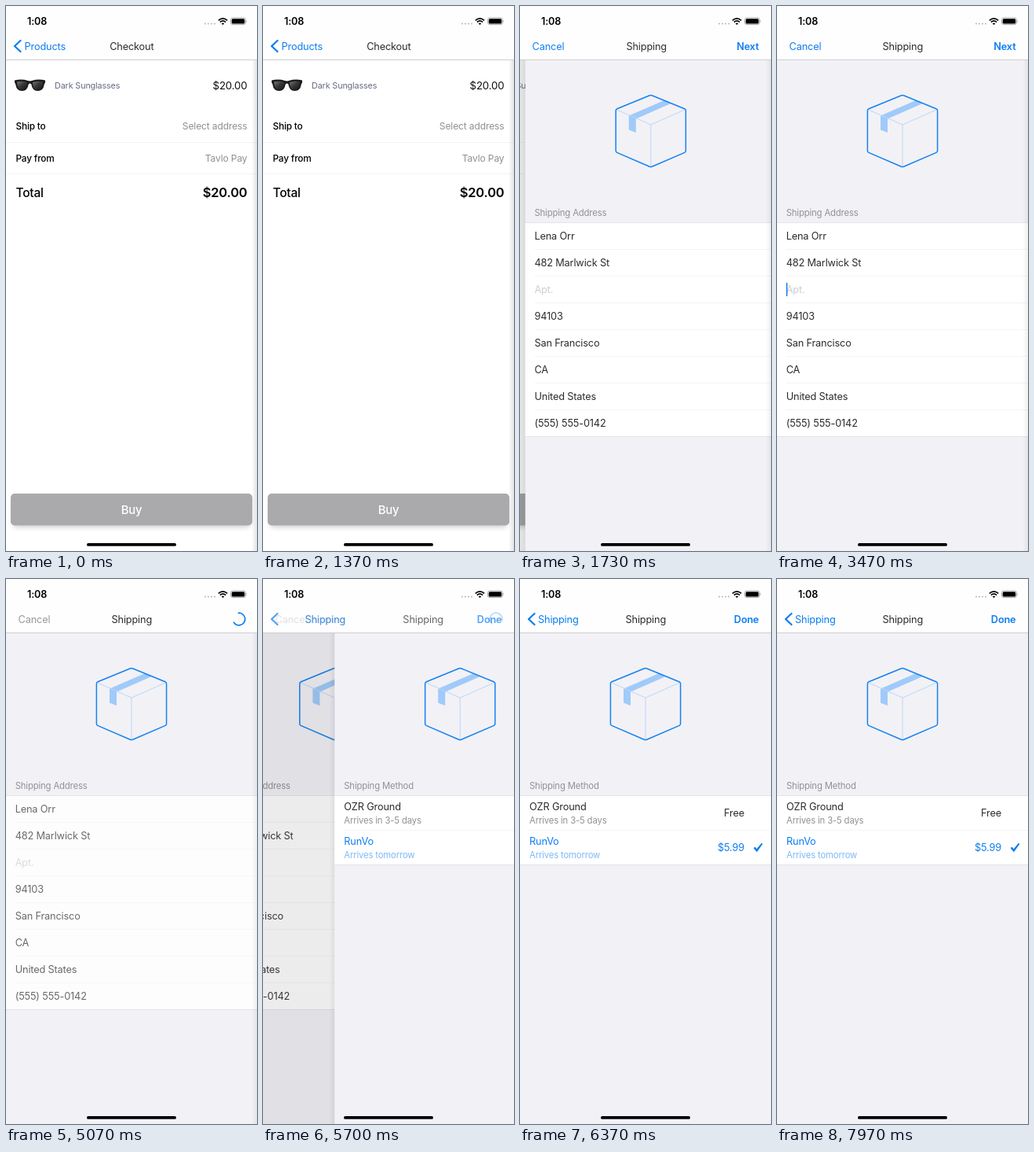
Recreate the animation shown at these times as an HTML page. Size 320 by 693 pixels, loop 8 s.

```html
<!DOCTYPE html>
<html lang="en">
<head>
<meta charset="utf-8">
<title>Checkout flow</title>
<style>
  html, body { margin: 0; width: 100%; height: 100%; overflow: hidden; background: #fff; }
  svg { display: block; width: 100vw; height: 100vh; }
  text { font-family: Inter, Roboto, sans-serif; font-size: 12.75px; letter-spacing: -.013em; fill: #2c2c2e; white-space: pre; }
  .blue { fill: #0d7df0; }
  .bold { font-weight: 600; }
  .med { font-weight: 500; }
  .mid { text-anchor: middle; }
  .end { text-anchor: end; }
  .head { font-size: 11.3px; fill: #919096; }
  .grey { fill: #909095; }
  .hint { fill: #cfcfd3; }
  .rule { stroke: #f4f3f6; stroke-width: 1; }
  .edge { stroke: #e5e4e8; stroke-width: 1; }
  .chevron { fill: none; stroke: #0d7df0; stroke-width: 2.3; stroke-linecap: round; stroke-linejoin: round; }
</style>
</head>
<body>
<svg viewBox="0 0 320 693" preserveAspectRatio="none">
  <defs>
    <linearGradient id="lens" x1="0" y1="0" x2="1" y2="1">
      <stop offset="0" stop-color="#77777a"/>
      <stop offset=".45" stop-color="#3a3a3c"/>
      <stop offset="1" stop-color="#151516"/>
    </linearGradient>
    <linearGradient id="shade">
      <stop offset="0" stop-color="#000" stop-opacity="0"/>
      <stop offset="1" stop-color="#000" stop-opacity=".06"/>
    </linearGradient>
    <filter id="soft" x="-10%" y="-30%" width="120%" height="180%">
      <feGaussianBlur stdDeviation="3"/>
    </filter>
    <g id="parcel" stroke-linejoin="round">
      <path d="M177 120L132 139.500V157.500L141 161V143.500L185.500 124z" fill="#a0caf9"/>
      <path d="M115.800 131.500L160 151L204.200 131.500M160 151V204" fill="none" stroke="#b9d8f8"/>
      <path d="M158.500 113.800Q160 113.200 161.500 113.800L203.100 130.700Q204.600 131.300 204.600 133V184Q204.600 185.700 203.100 186.400L161.500 204.200Q160 204.800 158.500 204.200L116.900 186.400Q115.400 185.700 115.400 184V133Q115.400 131.300 116.900 130.700z" fill="none" stroke="#1482f0" stroke-width="1.5"/>
    </g>
  </defs>

  <g id="checkout">
    <rect width="320" height="693" fill="#fff"/>
    <g id="glasses">
      <path d="M11 94.500Q20 92.500 28 95Q30.500 95.800 33 95Q41 92.500 50 94.500V97.500Q49 98 48.700 100Q47.500 108 40.500 108Q33.500 108 32.300 99.500Q30.500 97.500 28.700 99.500Q27.500 108 20.500 108Q13.500 108 12.300 100Q12 98 11 97.500z" fill="#1b1b1c"/>
      <path d="M14 96.500Q20 95 27 97Q27.200 106.500 20.700 106.500Q14.500 106.500 14 96.500z" fill="url(#lens)"/>
      <path d="M34 97Q41 95 47 96.500Q46.500 106.500 40.300 106.500Q33.800 106.500 34 97z" fill="url(#lens)"/>
    </g>
    <text x="62" y="104.500" style="font-size:10.8px;fill:#666a80">Dark Sunglasses</text>
    <text class="end" x="307.500" y="105.500" style="font-size:13.3px;fill:#111">$20.00</text>
    <text class="med" x="12.500" y="157.200" style="font-size:11.800px;fill:#000">Ship to</text>
    <text class="end grey" x="307.500" y="157.300" style="font-size:12.100px">Select address</text>
    <path class="rule" d="M0 173.500H320M0 213.500H320"/>
    <text class="med" x="12.500" y="197.700" style="font-size:11.800px;fill:#000">Pay from</text>
    <text class="end grey" x="307.500" y="197.800" style="font-size:12.100px">Tavlo Pay</text>
    <text class="med" x="12.500" y="243" style="font-size:15.500px;fill:#000">Total</text>
    <text class="end bold" x="307.500" y="243" style="font-size:16.500px;fill:#000">$20.00</text>
    <rect x="8" y="624" width="304" height="39" rx="6" fill="#000" opacity=".18" filter="url(#soft)"/>
    <rect x="6" y="620" width="308" height="40.500" rx="5" fill="#aaa9ab"/>
    <text class="mid med" x="160" y="646" style="font-size:14.900px;fill:#fff">Buy</text>
    <rect id="dimCheckout" width="320" height="693"/>
  </g>

  <g id="shipping">
    <rect x="-7" width="7" height="693" fill="url(#shade)"/>
    <rect width="320" height="693" fill="#f2f1f6"/>
    <use href="#parcel"/>
    <text class="head" x="11.700" y="266.500">Shipping Address</text>
    <rect id="formBack" y="275.500" width="320" height="272" fill="#fff"/>
    <path class="edge" d="M0 275.500H320M0 547.500H320"/>
    <g id="form"></g>
    <rect id="caret" x="11.800" y="352" width="1.500" height="17" class="blue"/>
    <rect id="dimShipping" width="320" height="693"/>
  </g>

  <g id="method">
    <rect x="-7" width="7" height="693" fill="url(#shade)"/>
    <rect width="320" height="693" fill="#f2f1f6"/>
    <use href="#parcel"/>
    <text class="head" x="12" y="266.500">Shipping Method</text>
    <rect y="275.500" width="320" height="88" fill="#fff"/>
    <path class="edge" d="M0 275.500H320M0 363.500H320"/>
    <path class="rule" d="M12 319.500H320"/>
    <text x="12" y="294">OZR Ground</text>
    <text class="head" x="12" y="311">Arrives in 3-5 days</text>
    <text class="end" x="286" y="302">Free</text>
    <text class="blue" x="12" y="338">RunVo</text>
    <text class="head" x="12" y="355" style="fill:#7fb9f4">Arrives tomorrow</text>
    <text class="blue end" x="286" y="346">$5.99</text>
    <path class="blue" d="M297.700 342.200L299.600 340.600L301.700 343.200L307.900 335.700L309.500 336.700L302 347.200z"/>
  </g>

  <rect width="320" height="68" fill="#fefefe"/>
  <path d="M0 68.500H320" stroke="#cfced3"/>

  <g id="navCheckout">
    <path class="chevron" d="M18.500 44L11 51L18.500 58"/>
    <text id="products" class="blue" x="23.500" y="55.700">Products</text>
    <text class="mid" x="160.300" y="55.700">Checkout</text>
  </g>
  <g id="navShipping">
    <text id="cancel" class="blue" x="15.500" y="55.700">Cancel</text>
    <text id="cancelOff" x="15.500" y="55.700" style="fill:#98989c">Cancel</text>
    <text id="shipTitle" class="mid" x="160.300" y="55.700">Shipping</text>
    <text id="next" class="blue bold end" x="304.500" y="55.700">Next</text>
    <circle id="spinner" cx="297" cy="51" r="7.800" fill="none" stroke="#0d7df0" stroke-width="1.700" stroke-dasharray="34 15.010"/>
  </g>
  <g id="navMethod">
    <path class="chevron" d="M18.500 44L11 51L18.500 58"/>
    <text id="back" class="blue" x="23" y="55.700">Shipping</text>
    <text id="methodTitle" class="mid" x="160.300" y="55.700">Shipping</text>
    <text class="blue bold end" x="304.500" y="55.700">Done</text>
  </g>

  <g id="status">
    <text class="bold" x="27" y="24" style="font-size:12.600px;fill:#000">1:08</text>
    <path d="M254 22.500h.01M258 22.500h.01M262 22.500h.01M266 22.500h.01" stroke="#bdbdc0" stroke-width="2.200" stroke-linecap="round"/>
    <g fill="none" stroke="#000" stroke-width="1.700">
      <path d="M270.800 18.300Q276.500 13.400 282.200 18.300M272.900 20.500Q276.500 17.400 280.100 20.500"/>
    </g>
    <path d="M274.700 22.200Q276.500 20.700 278.300 22.200L276.500 24.100z"/>
    <rect x="286.500" y="15" width="19" height="8.600" rx="2.600" fill="none" stroke="#999" stroke-width=".8"/>
    <rect x="287.700" y="16.200" width="16.600" height="6.200" rx="1.500"/>
    <path d="M306.500 17.700q1.500 1.600 0 3.200z" fill="#999"/>
  </g>
  <rect x="103" y="683" width="114" height="3.800" rx="1.900"/>
</svg>
<script>
const LOOP = 8000, PUSH_FORM = 1377, FOCUS = 3030, SUBMIT = 4250, PUSH_METHOD = 5547;
const BACK_TRAVEL = 111, TITLE_TRAVEL = 160;

const $ = id => document.getElementById(id);
const clamp = v => Math.min(1, Math.max(0, v));
const ramp = (t, from, to) => clamp((t - from) / (to - from));
const fade = (id, v) => $(id).setAttribute('opacity', clamp(v).toFixed(4));
const moveX = (id, x) => $(id).setAttribute('transform', `translate(${x.toFixed(3)} 0)`);

const fields = ['Lena Orr', '482 Marlwick St', 'Apt.', '94103', 'San Francisco', 'CA', 'United States', '(555) 555-0142'];
$('form').innerHTML = fields.map((label, i) => {
  const rule = i ? `<path class="rule" d="M12 ${275.5 + 34 * i}H320"/>` : '';
  return `${rule}<text class="${label === 'Apt.' ? 'hint' : ''}" x="11.700" y="${297.1 + 34 * i}">${label}</text>`;
}).join('');

// Remaining distance of a critically damped push, 1 to 0.
function spring(ms) {
  const a = Math.max(0, ms) * 0.0163;
  return (1 + a) * Math.exp(-a);
}
// Bar labels settle slightly ahead of the page.
const lead = p => Math.max(0, p - 0.0154) / 0.9846;

function caret(t) {
  if (t < FOCUS || t >= SUBMIT) return 0;
  const u = (t - FOCUS) % 1000;
  return u < 750 ? 1 - ramp(u, 500, 650) : ramp(u, 850, 1000);
}

function draw(t) {
  const p = spring(t - PUSH_FORM), q = spring(t - PUSH_METHOD);
  const waiting = ramp(t, SUBMIT, SUBMIT + 200);
  const busy = waiting * (1 - ramp(t, PUSH_METHOD, PUSH_METHOD + 200));

  moveX('checkout', -96 * (1 - p));
  moveX('shipping', p * 320 - 96 * (1 - q));
  moveX('method', q * 320);
  fade('dimCheckout', 0.1 * (1 - p));
  fade('dimShipping', 0.1 * (1 - q));

  fade('navCheckout', p);
  fade('products', 2 * p - 1);
  fade('navShipping', (1 - p) * q);
  fade('navMethod', 1 - q);
  moveX('shipTitle', TITLE_TRAVEL * lead(p) - BACK_TRAVEL * (1 - lead(q)));
  moveX('back', BACK_TRAVEL * lead(q));
  moveX('methodTitle', TITLE_TRAVEL * lead(q));

  fade('form', 1 - 0.3 * busy);
  fade('formBack', 1 - 0.15 * busy);
  fade('cancel', 1 - waiting);
  fade('cancelOff', waiting);
  fade('next', 1 - waiting);
  fade('spinner', waiting);
  const turn = (t - 5070) * 0.36 - 100;
  $('spinner').setAttribute('transform', `rotate(${turn.toFixed(2)} 297 51)`);
  fade('caret', caret(t));
}

const start = performance.now();
function tick() {
  draw((performance.now() - start) % LOOP);
  requestAnimationFrame(tick);
}
tick();
</script>
</body>
</html>
```
